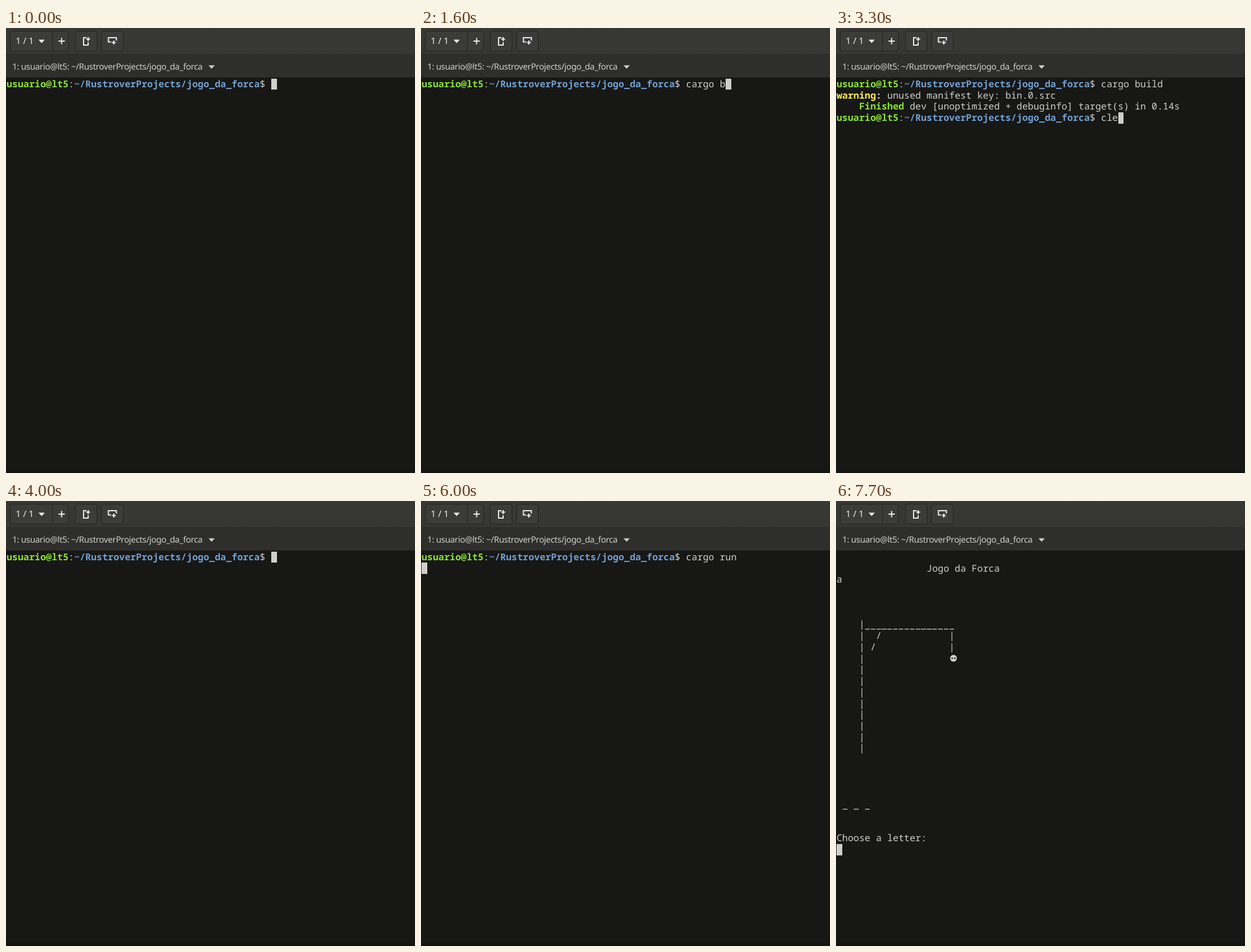
An HTML page that plays this animation: 717 px wide and 781 px high, repeating every 8 s.

```html
<!DOCTYPE html>
<html lang="en">
<head>
<meta charset="utf-8">
<title>Terminal</title>
<style>
  html, body { margin: 0; width: 100%; height: 100%; overflow: hidden; background: #171716; }
  #stage { position: relative; width: 717px; height: 781px; overflow: hidden; background: #171716; }
  #chrome { position: absolute; left: 0; top: 0; }
  #chrome text { font-family: "Noto Sans", sans-serif; text-rendering: geometricPrecision; }
  #screen {
    position: absolute; left: 1px; top: 88px; margin: 0;
    font: 16.45px/19.74px "Noto Sans Mono", monospace;
    font-variant-ligatures: none; text-rendering: geometricPrecision;
    color: #d0cfcc; white-space: pre;
  }
  #screen b { font-weight: 700; }
  .green { color: #8ae234; }
  .blue { color: #729fcf; }
  .yellow { color: #fce94f; }
  .dashes {
    position: relative; top: 1px;
    -webkit-mask: repeating-linear-gradient(90deg, #0000 0 .8px, #000 .8px 9px, #0000 9px 9.87px);
    mask: repeating-linear-gradient(90deg, #0000 0 .8px, #000 .8px 9px, #0000 9px 9.87px);
  }
  .head {
    position: absolute; left: 198.5px; top: 182px; width: 12px; height: 12px; border-radius: 50%;
    background:
      radial-gradient(circle at 3.6px 6px, #171716 1.1px, #0000 1.6px),
      radial-gradient(circle at 8.4px 6px, #171716 1.1px, #0000 1.6px), #d0cfcc;
  }
  #cursor { position: absolute; width: 9.87px; height: 19.74px; background: #d0cfcc; }
</style>
</head>
<body>
<div id="stage">
  <svg id="chrome" width="717" height="781" viewBox="0 0 717 781">
    <defs>
      <linearGradient id="bar" x2="0" y2="1">
        <stop stop-color="#383834"/><stop offset="1" stop-color="#363632"/>
      </linearGradient>
    </defs>
    <rect width="717" height="46" fill="url(#bar)"/>
    <rect y="46" width="717" height="41" fill="#2e2e2d"/>
    <path d="M0 46.5H717M0 86.5H717" stroke="#292928"/>
    <g fill="#3b3b39" stroke="#222220">
      <rect x="7.5" y="5.5" width="102" height="35" rx="4"/>
      <rect x="121.5" y="5.5" width="38" height="35" rx="4"/>
      <rect x="167.5" y="5.5" width="38" height="35" rx="4"/>
      <path d="M81.5 6V40"/>
    </g>
    <g fill="#eeeeec">
      <text x="17" y="28" font-size="15.5">1 / 1</text>
      <path d="M57 20.5H68L62.5 26.5Z"/>
    </g>
    <g fill="none" stroke="#eeeeec" stroke-width="2">
      <path d="M92 23H103M97.5 17.5V28.5"/>
      <path d="M141 17H136V30H144V25M144 16V23M140.5 19.5H147.5"/>
      <path d="M184 24.5H179.5V17H193.5V22M189 22V29M185.5 25.5H192.5"/>
    </g>
    <g fill="#cfcfcb">
      <text x="11" y="73" font-size="15" letter-spacing="-.36">1: usuario@lt5: ~/RustroverProjects/jogo_da_forca</text>
      <path d="M355 65.5H366L360.5 71.5Z"/>
    </g>
    <rect y="776" width="717" height="5" fill="#141413"/>
    <path d="M716.5 87V781" stroke="#111110"/>
  </svg>
  <pre id="screen"></pre>
  <div id="cursor"></div>
</div>
<script>
const LOOP = 8000, CELL = 9.87, ROW = 19.74;
const screen_ = document.getElementById('screen');
const cursor = document.getElementById('cursor');

const bold = (color, text) => `<b class="${color}">${text}</b>`;
const dashes = text => `<span class="dashes">${text}</span>`;
const prompt_ = bold('green', 'usuario@lt5') + ':' +
  bold('blue', '~/RustroverProjects/jogo_da_forca') + '$ ';
const warning = bold('yellow', 'warning') + '<b>:</b> unused manifest key: bin.0.src\n';
const finished = '    ' + bold('green', 'Finished') +
  ' dev [unoptimized + debuginfo] target(s) in 0.14s\n';

function game(guess, hanged) {
  const post = '    |';
  const lines = Array(26).fill('');
  lines.fill(post, 6, 18);
  lines[1] = ' '.repeat(16) + 'Jogo da Forca';
  lines[2] = guess;
  lines[6] += dashes('_'.repeat(16));
  lines[7] += '  /' + ' '.repeat(12) + '|';
  lines[8] += ' /' + ' '.repeat(13) + '|';
  if (hanged) lines[9] += '<i class="head"></i>';
  lines[22] = dashes(' _ _ _');
  lines[25] = 'Choose a letter:';
  return lines.join('\n') + '\n';
}

// Each scene: start time, screen content, cursor visibility.
const scenes = [];
const show = (time, html, lit = true) => scenes.push({ time, html, lit });
const type = (before, command, steps) =>
  steps.forEach(([time, count]) => show(time, before + command.slice(0, count)));

const built = prompt_ + 'cargo build\n';
const done = built + warning + finished;
const board = game('', false);

show(0, prompt_);
show(300, prompt_, false);
show(500, prompt_);
type(prompt_, 'cargo build', [[600, 1], [800, 2], [1100, 3], [1300, 4], [1400, 6],
  [1600, 7], [1700, 8], [1800, 9], [2000, 10], [2100, 11]]);
show(2300, built);
show(2400, built + warning);
show(2500, done);
show(2600, done + prompt_);
show(2900, done + prompt_, false);
type(done + prompt_, 'clear', [[3000, 1], [3300, 3], [3600, 4], [3800, 5]]);
show(4000, prompt_);
type(prompt_, 'cargo run', [[4300, 1], [4600, 2], [4900, 3], [5100, 4], [5200, 5],
  [5300, 6], [5400, 7], [5500, 8], [5700, 9]]);
show(6000, prompt_ + 'cargo run\n');
show(6100, board);
show(6600, board, false);
show(7100, board);
show(7200, board + 'a');
show(7700, game('a', true));

let current;
function render(time) {
  const scene = scenes.findLast(s => s.time <= time);
  if (scene === current) return;
  current = scene;
  screen_.innerHTML = scene.html;
  const lines = screen_.textContent.split('\n');
  cursor.style.left = 1 + lines.at(-1).length * CELL + 'px';
  cursor.style.top = 88.6 + (lines.length - 1) * ROW + 'px';
  cursor.style.visibility = scene.lit ? 'visible' : 'hidden';
}

const start = performance.now();
function tick() {
  render((performance.now() - start) % LOOP);
  requestAnimationFrame(tick);
}
tick();
</script>
</body>
</html>
```
